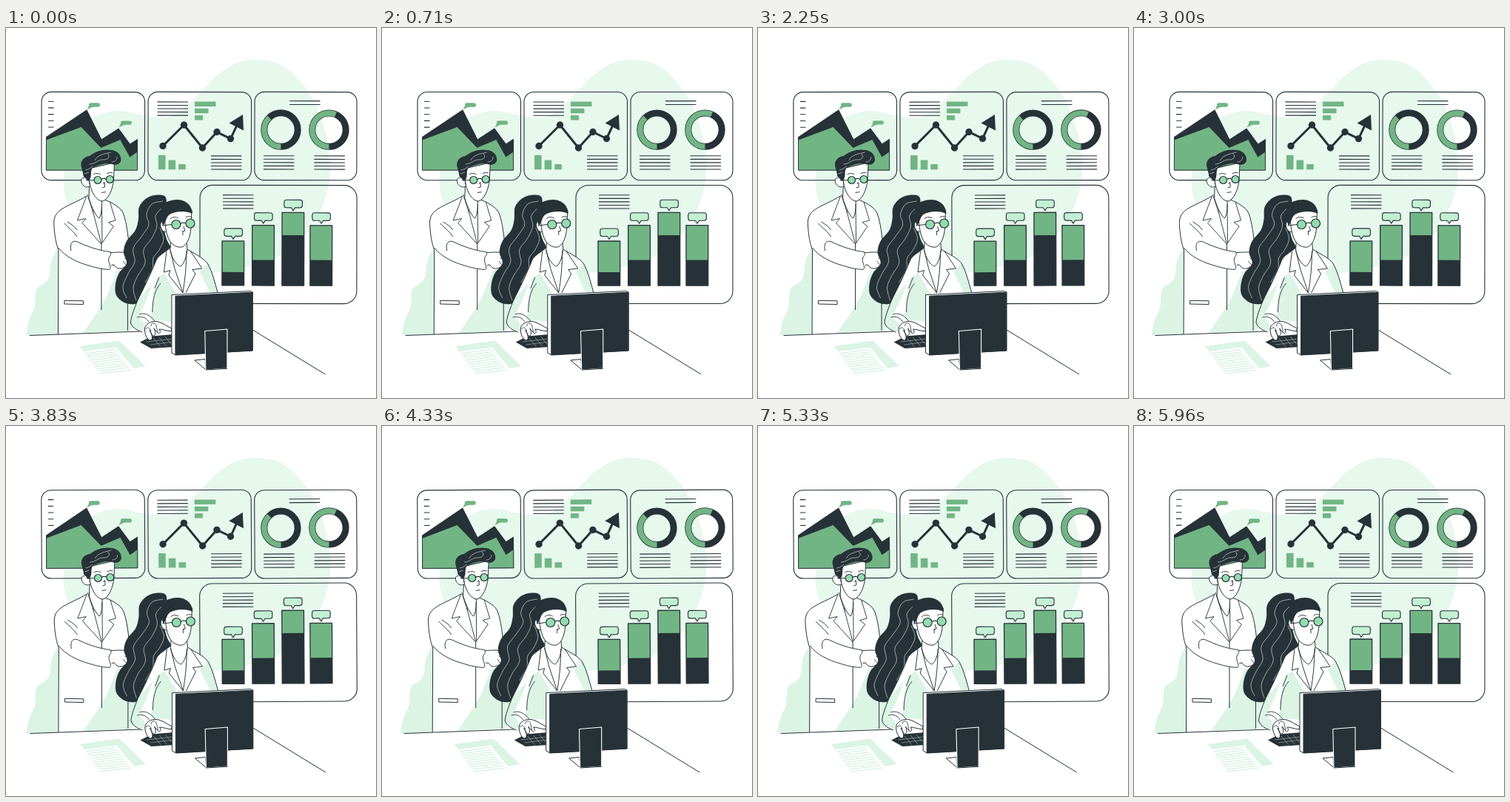
Animation, 500 px wide and 500 px high, one loop 6000 ms. Source, as an HTML page with a canvas:

```html
<!DOCTYPE html>
<html lang="en">
<head>
<meta charset="utf-8">
<title>Data review</title>
<style>
  html, body { margin: 0; width: 100%; height: 100%; overflow: hidden; background: #fff; }
  canvas { display: block; width: 500px; height: 500px; }
</style>
</head>
<body>
<canvas id="stage"></canvas>
<script>
const INK = '#263238', GREEN = '#72b585', MINT = '#a9e5c0', LENS = '#93dcae';
const PALE = '#e7f8ed', SHADE = '#dbf4e4', WHITE = '#fff';
const LOOP = 6000, LEAD = 40, SWING = 1500;

const canvas = document.getElementById('stage');
const ctx = canvas.getContext('2d');
const dpr = window.devicePixelRatio || 1;
canvas.width = canvas.height = 500 * dpr;

// ---- drawing helpers ----
function draw(shape, fill, stroke, width = 1) {
  const p = typeof shape === 'string' ? new Path2D(shape) : shape;
  if (fill) { ctx.fillStyle = fill; ctx.fill(p); }
  if (stroke) { ctx.strokeStyle = stroke; ctx.lineWidth = width; ctx.stroke(p); }
}
const ink = (d, width = 1) => draw(d, null, INK, width);

// Catmull-Rom curve through x,y pairs
function spline(v, closed) {
  const n = v.length / 2, p = new Path2D();
  const at = i => {
    i = closed ? (i + n) % n : Math.max(0, Math.min(n - 1, i));
    return [v[2 * i], v[2 * i + 1]];
  };
  p.moveTo(...at(0));
  for (let i = 0; i < (closed ? n : n - 1); i++) {
    const [a, b, c, d] = [at(i - 1), at(i), at(i + 1), at(i + 2)];
    p.bezierCurveTo(b[0] + (c[0] - a[0]) / 6, b[1] + (c[1] - a[1]) / 6,
                    c[0] - (d[0] - b[0]) / 6, c[1] - (d[1] - b[1]) / 6, c[0], c[1]);
  }
  return p;
}
function circle(x, y, r, fill, stroke, width) {
  const p = new Path2D();
  p.arc(x, y, r, 0, 7);
  draw(p, fill, stroke, width);
}
function box(x, y, w, h, r, fill, stroke, width) {
  const p = new Path2D();
  p.roundRect(x, y, w, h, r);
  draw(p, fill, stroke, width);
}
function rows(x, y, w, n, gap = 4.55) {
  for (let i = 0; i < n; i++) ink(`M${x} ${y + i * gap}h${w}`, 1.1);
}

// ---- motion ----
const mix = (a, b, k) => a + (b - a) * k;
const SHAKE = [0, -1, 2, -4, 4, -4, 4, -4, 2, -1, 0];
function shake(t) {
  const k = t / LOOP * 10, i = Math.floor(k);
  return mix(SHAKE[i], SHAKE[i + 1], k - i);
}
function tilt(t) {
  const k = t % SWING / SWING;
  return k < .25 ? k * 4 : k < .75 ? 2 - k * 4 : k * 4 - 4;
}

// ---- wall panels ----
function panel(x, y, w, h, r, angle, content) {
  ctx.save();
  ctx.translate(x + w / 2, y + h / 2);
  ctx.rotate(angle);
  ctx.translate(-x - w / 2, -y - h / 2);
  box(x, y, w, h, r, null, INK, 1.1);
  content();
  ctx.restore();
}

function areaChart() {
  rows(57, 99.3, 7.5, 5, 8.7);
  draw('M54.5 147.5L109 111L129 151L152 136L167.5 157L177.5 150.5V192H54.5Z', INK, INK);
  draw('M54.5 151L101.5 133.5L128.5 161.5L154.5 150.5L167.5 174L177.5 167V192H54.5Z', GREEN, INK, .8);
  for (const [x, y] of [[112, 101.3], [155, 125.3]]) {
    box(x, y, 15, 5.4, 2.5, GREEN);
    draw(`M${x + .5} ${y + 3}L${x - 2.5} ${y + 9}L${x + 6} ${y + 5}Z`, GREEN);
  }
}

function trendChart() {
  rows(204.5, 100, 41.5, 5);
  [28.5, 18.5, 11].forEach((w, i) => box(255, 99.5 + i * 9.3, w, 6.4, 0, GREEN));
  [19.5, 12.8, 7.3].forEach((h, i) => box(206 + i * 13.6, 191.3 - h, 9.6, h, 0, GREEN));
  rows(277, 172.8, 41.5, 5);
  ink('M212 159.5L240.5 131L265.5 162L285 140.5L303.5 149.5L314 127', 3);
  for (const [x, y] of [[212, 159.5], [240.5, 131], [265.5, 162], [285, 140.5], [303.5, 149.5]])
    circle(x, y, 4.7, INK);
  draw('M320 117L301.5 128.5L321 138.5Z', INK);
}

function donut(x, y, from) {
  circle(x, y, 22.7, null, INK, 9);
  const p = new Path2D();
  p.arc(x, y, 22.7, Math.PI / 2, from);
  draw(p, null, GREEN, 7.4);
}
function donutCharts() {
  rows(383, 98.6, 41.5, 2, 4.9);
  donut(371.5, 137.6, 3.95);
  donut(436.5, 137.6, 5.12);
  rows(348, 172.8, 41.5, 5);
  rows(416.5, 172.8, 41.5, 5);
}

function barChart() {
  rows(293, 225.8, 41.5, 5);
  for (const [x, top, split] of [[292, 288, 330], [332.7, 266.7, 313.5], [373, 249.3, 280], [411, 266.7, 313.5]]) {
    box(x, top, 29.7, 348 - top, 0, GREEN, INK, 1.3);
    box(x, split, 29.7, 348 - split, 0, INK);
    const l = x + 2.8, r = l + 24.6, m = x + 15, y = top - 17;
    draw(`M${l + 3} ${y}H${r - 3}q3 0 3 3v4.5q0 3 -3 3H${m + 2.5}L${m} ${y + 14.5}L${m - 2.5} ${y + 10.5}` +
         `H${l + 3}q-3 0 -3 -3v-4.5q0 -3 3 -3Z`, '#c3efd3', INK, 1.1);
  }
}

// ---- people and desk ----
function man() {
  draw('M109 227C98 234 84 239 75 245C66 251 64 258 65 268C66 283 68 292 71 300L70.5 414L165 409.5L166 300C166 285 163 262 157 249L141 236Z', WHITE);
  draw('M150 328L136 363L126 380L104.5 412L165 409.5L190 395V330Z', SHADE);
  ink('M109 227C98 234 84 239 75 245C66 251 64 258 65 268C66 283 68 292 71 300L70.5 414');
  ink('M140.5 235C150 240 157 245 159 252C163 263 165 280 167 300M164.5 372V409');
  ink('M129 292V381M79 368.3L104.5 368.8V373.5L79 373Z');

  // shirt, lapels and neck
  draw('M113 207L112 230C116 243 122 255 126 257C129 253 130 242 129.5 233Z', WHITE, INK);
  ink('M109 227L96.5 260L108 257.5L103 263.5L129 292M117 246L129 292M140.5 235L148 260L138.5 262.5L145.5 268L129 292M129.5 238L130 290', .9);
  ink('M110 225L118 250M140.5 235L133 232', .9);

  // pointing arm
  draw('M138 304C158 302 164 303 168 306L185 313.5C189 316 186 318 182 317.5L172 316C175 319 182 323 182 324C180 326 174 321 170 319C172 324 170 327 166 325L160 323C154 327 149 325 146 320L137 321Z', WHITE, INK);
  ink('M160 311L173 316M158 315L166 325M170 319L163 313', .8);
  draw('M70 290C78 306 96 316 112 321C124 325 133 326 139.5 326.5C143 325 145 308 141 302.5C125 301 107 294 97 289C91 287 87 288 86 294Z', WHITE);
  ink('M71 297C80 309 97 317 112 321C124 325 133 326 139.5 326.5C144 323 137 317 139 311C140 308 143 307 141 302.5C125 301 107 294 97 289C89 286 86 292 88 301M79 264C84 270 91 274 96 282M83 262C88 265 93 268 96 273', .95);

  // head
  draw('M106 203C101 201 100 209 105 213C108 216 112 215 114 213', WHITE, INK);
  draw('M112 190C112 204 113 214 117 222C121 230 126 234 131 234C139 231 144 218 145.5 206L146.5 182Z', WHITE, INK);
  draw('M102.5 190C99 180 105 174 113 173C121 166 133 163 143 165C151 166 156 172 155.5 179C154 185 147 186 142 183.5C136 182 128 184 121 187C117 188 115 190 115 197C115 204 112 208 110 206C108 202 104 202 104.5 198Z', INK);
  for (const d of ['M113 184C121 184 125 177 132 178C139 178 141 173 137 170', 'M120 179C124 171 134 170 142 168', 'M107 192C111 192 114 189 117 187', 'M106 197L112 195', 'M143 181C148 181 151 177 150 174'])
    draw(d, null, WHITE, .55);
  ink('M118 198C121 196 125 196 128 198M136 197C139 195 142 195 144 196M133 208L131.5 211M133.5 209V215L130 216M129 222.5L135 221.5', .95);
  ink('M112 206L119 205.5M129 204.5Q132 202.5 135.5 204.2', 1.2);
  circle(124, 205.5, 5, LENS, INK, 1.2);
  circle(140.4, 204.5, 5, LENS, INK, 1.2);
}

function woman() {
  draw(spline([216, 229, 204, 225.5, 190, 230, 180, 242, 179, 258, 175, 273, 163, 288, 159, 303, 163, 318, 153, 331, 148, 346, 149, 361, 160, 371, 174, 373,
               190, 367, 197, 348, 210, 334, 222, 315, 224, 300, 217, 285, 214, 270, 216, 250], true), INK);
  for (const v of [[212, 234, 197, 238, 190, 252, 193, 266, 183, 282, 172, 298, 174, 316, 165, 332, 158, 350, 163, 365],
                   [210, 244, 202, 254, 204, 268, 197, 284, 186, 300, 188, 318, 178, 335, 172, 351, 176, 368],
                   [208, 270, 213, 285, 207, 300, 199, 311, 198, 326, 188, 344]])
    draw(spline(v), null, '#dce6e2', .65);

  // coat
  draw('M222 297C214 304 206 307 203 314C196 332 185 354 178 368C173 380 169 391 168.5 398C171 406 181 409 188 411L230 402V362L286 357C282 343 279 330 273 319C268 311 256 306 245 299Z', WHITE);
  draw('M203 338L198 371L196 394L224 397V365L232 362L214 331Z', SHADE);
  draw('M178 368C173 380 169 391 168.5 398C171 406 181 409 188 411L186 398L179 391C183 381 192 366 198 345Z', SHADE);
  draw('M262 330L272 318C279 330 282 343 286 357L276 358Z', SHADE);
  ink('M222 297C214 304 206 307 203 314C196 332 185 354 178 368C173 380 169 391 168.5 398C170 404 176 408 184 411');
  ink('M245 299C256 306 268 311 273 319C279 330 282 343 286 357');
  ink('M209 345C201 354 198 367 198 384M201 352L207 337M180 387C187 384 195 388 201 396M177 391C183 389 189 391 193 397', .9);
  draw('M223 285L222 300C226 317 233 321 236 322C241 319 244 308 245 299L244 289Z', WHITE, INK);
  ink('M217 302L213.5 330L222 327.5L220 334L239 358M222 300L228 325L239 358M249 301L265 325L252 326.5L256 332L243 358M244 301C244 321 242 340 239 358', .95);

  // head
  draw('M216 263C210 258 207 265 210 271C212 276 216 276 218 274', WHITE, INK);
  draw('M215 248C214 263 216 278 221 287C225 294 232 297 238 296C245 293 249 283 250 270L251 246Q231 238 215 248Z', WHITE, INK);
  draw('M212 267C207 250 208 238 220 234C233 229 251 233 252 251C244 247 230 247 221 252C216 256 216 264 212 267Z', INK);
  ink('M222 258C225 255 229 255 233 257M243 256C246 254 249 254 251 256M240 268L242 274L238.5 275M239 274V280M236 286.5', .95);
  ink('M211 267L224 265.5M235.5 264.5Q239 262 243.3 263.8', 1.2);
  circle(230, 265.5, 6, LENS, INK, 1.2);
  circle(249, 264, 6, LENS, INK, 1.2);
}

function papers() {
  draw('M99.5 430L153 422.5L188.5 457L172 460L150 433L106 438Z', SHADE);
  draw('M106 437L149 431.5L174 461.5L127 467Z', WHITE);
  for (let i = 0; i < 10; i++) {
    const k = i / 9;
    draw(`M${mix(107, 126, k)} ${mix(440, 467, k)}L${mix(147, 169, k)} ${mix(434.5, 462, k)}`, null, '#c5ecd3', .9);
  }
}

function desk() {
  draw('M181 424.5L197 416.5L226 414V431L196 433Z', INK);
  for (const d of ['M190 424L226 420', 'M195 428L226 424', 'M199 419L209 431', 'M207 418L217 430', 'M215 417L224 428'])
    draw(d, null, '#aebbb8', .6);
  draw('M188 404C191 398 199 395 206 397C213 399 219 404 224 406L223 410C216 409 211 407 207 407C210 411 208 414 205 412L200 406C203 412 202 417 198 416L194 408C198 415 199 421 195 422C191 422 186 412 188 404Z', WHITE, INK);
  ink('M196 403C196 398 201 397 203 402L205 411M189 407C191 403 195 405 196 410', .8);

  draw('M224 360.5L330 355.5L333.5 357V436L229.5 442L224 439Z', WHITE, INK);
  draw('M229 362.3L333 357.2V436L229 441.7Z', INK, INK);
  draw('M269 447.5L255 449L270.5 462Z', WHITE, INK);
  draw('M268.8 409.5L299 407V460L270 462Z', INK, WHITE, 1.1);
  ink('M270 462L299 460.3');
}

function people() {
  draw('M27.5 415.5C28 404 31 394 35 386C42 376 38 365 41 354C43 347 52 348 57 340C62 331 58 318 64 309L71 295V414Z', SHADE);
  man();
  ink('M32 415.5L181 410M333.5 408L431.5 468');
  papers();
  woman();
  desk();
}

const backdrop = spline([340, 43, 375, 52, 407, 84, 428, 127, 438, 180, 433, 225, 412, 270, 375, 305, 325, 323, 265, 332, 200, 330, 135, 305, 95, 260, 78, 215,
                         85, 165, 110, 126, 148, 112, 186, 118, 222, 120, 252, 98, 283, 66, 310, 48], true);

function render(t) {
  ctx.setTransform(dpr, 0, 0, dpr, 0, 0);
  ctx.fillStyle = WHITE;
  ctx.fillRect(0, 0, 500, 500);
  ctx.lineJoin = 'round';
  draw(backdrop, PALE);

  const a = tilt(t) * Math.PI / 180;
  panel(48, 86.5, 139.5, 119.2, 13, a, areaChart);
  panel(192, 86.5, 139.5, 119.2, 13, a, trendChart);
  panel(336, 86.5, 138, 119.2, 13, a, donutCharts);
  panel(262, 212.5, 212, 160, 17, a, barChart);

  ctx.translate(shake(t), 0);
  people();
}

const start = performance.now();
function frame() {
  render((performance.now() - start + LEAD) % LOOP);
  requestAnimationFrame(frame);
}
frame();
</script>
</body>
</html>
```
